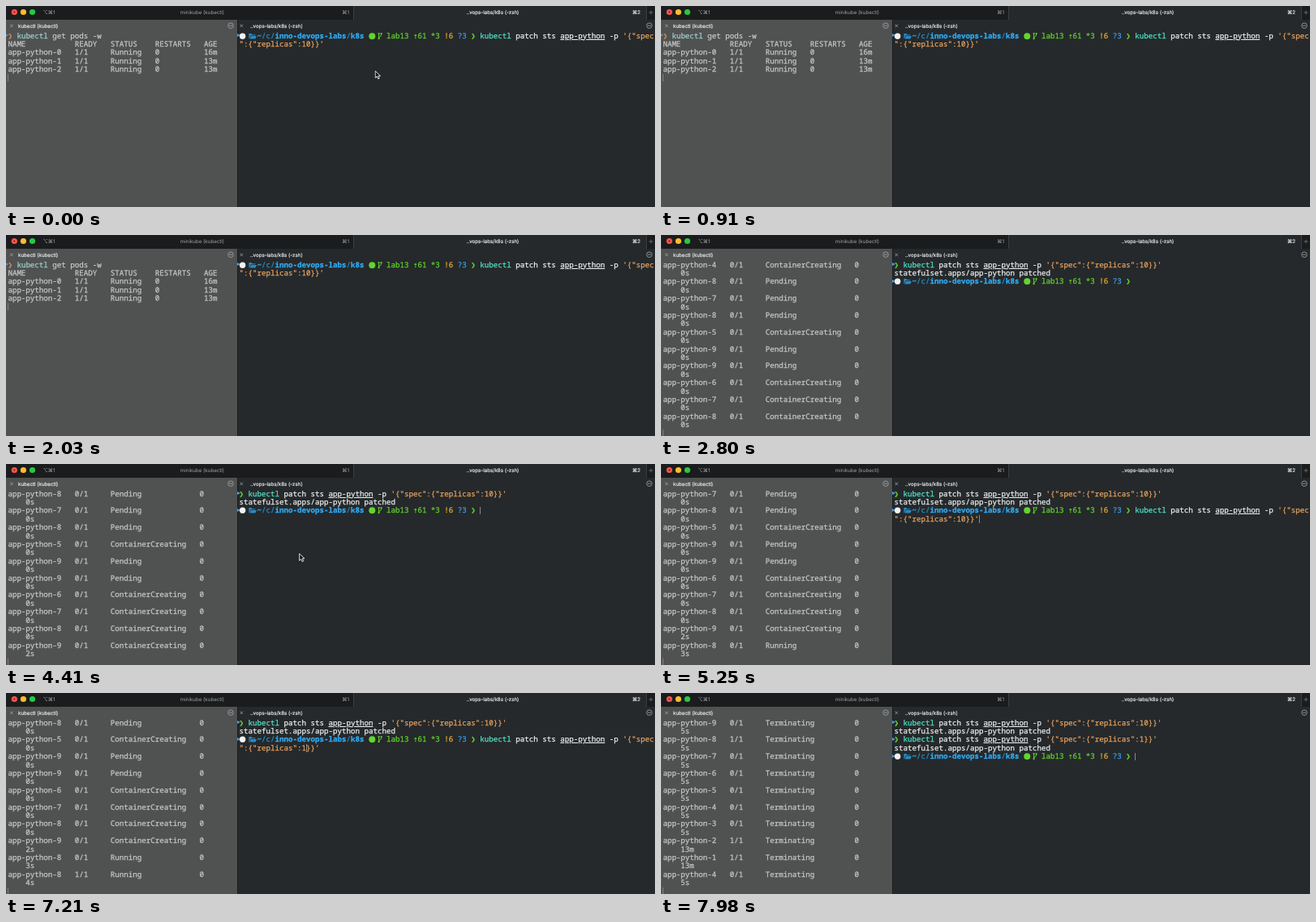
An HTML page that plays this animation: 800x248 px, repeating every 8 s.

```html
<!DOCTYPE html>
<html lang="en">
<head>
<meta charset="utf-8">
<title>Scaling a StatefulSet</title>
<style>
html, body { margin: 0; width: 100%; height: 100%; overflow: hidden; background: #25292b; }
#stage { position: relative; width: 800px; height: 248px; overflow: hidden; background: #25292b; }
#chrome { position: absolute; inset: 0; font: 6.2px Inter, "DejaVu Sans", sans-serif; text-rendering: geometricPrecision; }
.rows {
  position: absolute; top: 31.5px; margin: 0; white-space: pre; color: #eceeee;
  font: 500 9.17px/10.42px "Noto Sans Mono", "DejaVu Sans Mono", monospace;
  text-rendering: geometricPrecision; font-variant-ligatures: none;
  -webkit-text-stroke: .25px currentColor;
}
.rows div { height: 10.42px; position: relative; }
#left { left: 2.4px; color: #c6c8c8; }
#right { left: 287.6px; }
.g { display: inline-block; width: 5.5px; height: 10.42px; vertical-align: top; overflow: visible; }
.mark::before {
  content: ""; position: absolute; left: -3px; top: 2.4px;
  border: solid transparent; border-width: 2.9px 0 2.9px 4px; border-left-color: #4a9be0;
}
.icon { position: absolute; top: 0; overflow: visible; }
.ok { color: #63d42e; }
.warn { color: #e3ad35; }
.info { color: #3b9fe6; }
.dir { color: #2590d0; }
.dir b { color: #2fabf5; }
.cmd { color: #52e3c8; }
.str { color: #e8a25f; }
.arg { text-decoration: underline; text-decoration-thickness: 1px; text-underline-offset: 1.2px; }
.old { color: #cf8a58; }
#left .cmd { color: #9fd0c9; }
.caret { position: absolute; width: 1px; height: 9.4px; background: #85898b; }
#leftCaret { left: 2px; background: #7d8081; }
#mouse { position: absolute; left: 0; top: 0; }
</style>
</head>
<body>
<div id="stage">
  <svg id="chrome" width="800" height="248" viewBox="0 0 800 248">
    <rect y="16" width="285" height="232" fill="#505252"/>
    <rect width="428" height="17" fill="#1a1c1d"/>
    <rect x="428" width="1" height="17" fill="#3b3f41"/>
    <rect x="789" width="1" height="17" fill="#3b3f41"/>
    <rect x="790" width="10" height="17" fill="#1a1c1d"/>
    <rect x="285" y="17" width="1" height="231" fill="#1a1d1e"/>
    <circle cx="10.3" cy="7.5" r="3.6" fill="#f9564f"/>
    <circle cx="10.3" cy="7.5" r="1" fill="#7d1712"/>
    <circle cx="21.4" cy="7.5" r="3.6" fill="#febc2e"/>
    <circle cx="32.5" cy="7.5" r="3.6" fill="#28c840"/>
    <g fill="#a4a6a7">
      <text x="45.5" y="9.9">⌥⌘1</text>
      <text x="242" y="9.9" text-anchor="middle">minikube (kubectl)</text>
      <text x="423" y="9.9" text-anchor="end">⌘1</text>
    </g>
    <g fill="#e3e5e6" stroke="#e3e5e6" stroke-width=".2">
      <text x="600" y="9.9" text-anchor="middle">..vops-labs/k8s (-zsh)</text>
      <text x="782" y="9.9" text-anchor="end">⌘2</text>
      <text x="15" y="26.6">kubectl (kubectl)</text>
      <text x="301" y="26.6">..vops-labs/k8s (-zsh)</text>
    </g>
    <g fill="none" stroke="#a4a7a8" stroke-width=".8">
      <path d="M792.5 8h5M795 5.5v5" stroke="#74787a"/>
      <path d="M5.2 22.7l3.4 3.4m0-3.4l-3.4 3.4M288.6 22.7l3.4 3.4m0-3.4l-3.4 3.4"/>
      <circle cx="277" cy="24.2" r="3.3"/><path d="M275 24.2h4"/>
      <circle cx="793" cy="24.2" r="3.3"/><path d="M791 24.2h4"/>
    </g>
  </svg>
  <div id="left" class="rows"></div>
  <div id="right" class="rows"></div>
  <div id="leftCaret" class="caret"></div>
  <div id="rightCaret" class="caret"></div>
  <svg id="mouse" width="10" height="13" viewBox="0 0 10 13">
    <path d="M.7.6v8.6l2-1.8 1.4 3 1.6-.7-1.4-3h2.7z" fill="#16191a" stroke="#f4f4f4" stroke-width=".9"/>
  </svg>
</div>
<script>
const LOOP = 8000, CH = 5.5, ROW = 10.42, TOP = 31.5;
const $ = id => document.getElementById(id);
const span = (cls, text) => `<span class="${cls}">${text}</span>`;
const line = (html, cls = '') => `<div class="${cls}">${html || ' '}</div>`;
const glyph = (cls, ch) => span('g ' + cls, ch);
const icon = (col, w, body) =>
  `<svg class="icon" style="left:${col * CH}px" width="${w}" height="10">${body}</svg>`;

// Left pane: pod table followed by watch events
const head = [
  glyph('old', '❯') + ' ' + span('cmd', 'kubectl') + ' get pods -w',
  'NAME           READY   STATUS    RESTARTS   AGE',
  ...['16m', '13m', '13m'].map((age, i) => `app-python-${i}   1/1     Running   0          ${age}`)
];
const status = { P: 'Pending', C: 'ContainerCreating', R: 'Running', T: 'Terminating' };
const events = [];
function emit(start, end, list) {
  const items = list.split(' ');
  items.forEach((item, i) => {
    const [code, ready = '0', age = '0s'] = item.split(':');
    const at = start + (end - start) * (i + 1) / items.length;
    events.push({ at, rows: [
      `app-python-${code[0]}   ${ready}/1     ${status[code[1]].padEnd(20)}0`,
      '    ' + age
    ] });
  });
}
emit(2240, 2520, '3P 3P 4P 4P 5P 3C 5P 6P 6P 7P 4C 8P 7P 8P 5C 9P 9P 6C 7C 8C');
emit(3850, 3920, '9C:0:2s');
emit(5180, 5250, '8R:0:3s');
emit(6720, 6790, '8R:1:4s');
emit(7560, 7770, '9T:0:5s 8T:1:5s 7T:0:5s 6T:0:5s 5T:0:5s 4T:0:5s 3T:0:5s 2T:1:13m 1T:1:13m 4T:0:5s');

function leftRows(t) {
  const rows = head.concat(...events.filter(e => e.at <= t).map(e => e.rows));
  return rows.slice(-20);
}

// Right pane: prompt, edited command, output
const call = span('cmd', 'kubectl') + ' patch sts ' + span('arg', 'app-python') + ' -p ';
const folder = '<path d="M.4 2h3l1 1.2h4v1H2.6L.8 8.4H.4zM3 4.9h7L8.4 8.4H1.4z" fill="#288bc6"/>';
const branch = '<path d="M1.6 2.2v6.2M4.6 2.4v1.4Q4.6 5.4 1.6 6.6" fill="none" stroke="#63d42e"/>' +
  '<g fill="#63d42e"><circle cx="1.6" cy="2" r="1.1"/><circle cx="4.6" cy="2.2" r="1.1"/><circle cx="1.6" cy="8.2" r="1.1"/></g>';
const prompt =
  icon(0, 9, '<circle cx="3.6" cy="5.2" r="3.7" fill="#f2f3f3"/>') +
  icon(2, 10, folder) +
  icon(29, 9, '<circle cx="4.3" cy="5.2" r="4" fill="#63d42e"/>') +
  icon(31, 7, branch) +
  '    ' + span('dir', '<b>~</b>/c/<b>inno-devops-labs</b>/<b>k8s</b>') + '     ' +
  span('ok', 'lab13 ' + glyph('', '⇡') + '61 *3') + ' ' + span('warn', '!6') + ' ' +
  span('info', '?3') + ' ' + glyph('ok', '❯') + ' ';
const editing = n => [
  line(prompt + call + span('str', `'{"spec`), 'mark'),
  line(span('str', `":{"replicas":${n}}}'`))
];
const sent = n => line(glyph('ok', '❯') + ' ' + call + span('str', `'{"spec":{"replicas":${n}}}'`), 'mark');
const reply = line('statefulset.apps/app-python patched');
const idle = line(prompt, 'mark');

// Each step: start time, rows, caret row, caret column
const first = [sent(10), reply];
const steps = [
  [-800, editing(10), 1, 19],
  [2170, [sent(10)], 1, 0],
  [2240, [...first, idle], 2, 54],
  [5110, [...first, ...editing(10)], 3, 19],
  [5390, [...first, ...editing(10)], 3, 18],
  [5600, [...first, ...editing(10)], 3, 17],
  [5670, [...first, ...editing(10)], 3, 16],
  [6790, [...first, ...editing(1)], 3, 15],
  [7490, [...first, sent(1)], 3, 0],
  [7630, [...first, sent(1), reply, idle], 4, 54]
];

const shown = {};
function put(id, html) {
  if (shown[id] !== html) $(id).innerHTML = shown[id] = html;
}

function moveMouse(t) {
  const seen = t < 910 || (t >= 3500 && t < 5110);
  const k = t < 910 ? 0 : Math.min(1, Math.max(0, (t - 3500) / 500));
  const e = k * k * (3 - 2 * k);
  $('mouse').style.visibility = seen ? 'visible' : 'hidden';
  $('mouse').style.transform = `translate(${454.5 - 93.5 * e}px, ${79.5 + 30.5 * e}px)`;
}

function draw(now) {
  const t = now % LOOP;
  const rows = leftRows(t);
  put('left', rows.map((r, i) => line(r, r === head[0] ? 'mark' : '')).join(''));
  $('leftCaret').style.top = TOP + rows.length * ROW + .5 + 'px';

  const [start, lines, row, col] = steps.filter(s => s[0] <= t).pop();
  put('right', lines.join(''));
  const caret = $('rightCaret').style;
  caret.left = 287.2 + col * CH + 'px';
  caret.top = TOP + row * ROW + .5 + 'px';
  // The blink restarts with each edit
  caret.visibility = (t - start) % 1000 < 500 ? 'visible' : 'hidden';

  moveMouse(t);
  requestAnimationFrame(frame);
}
let begin;
function frame(now) {
  begin ??= now;
  draw(now - begin);
}
draw(0);
</script>
</body>
</html>
```
